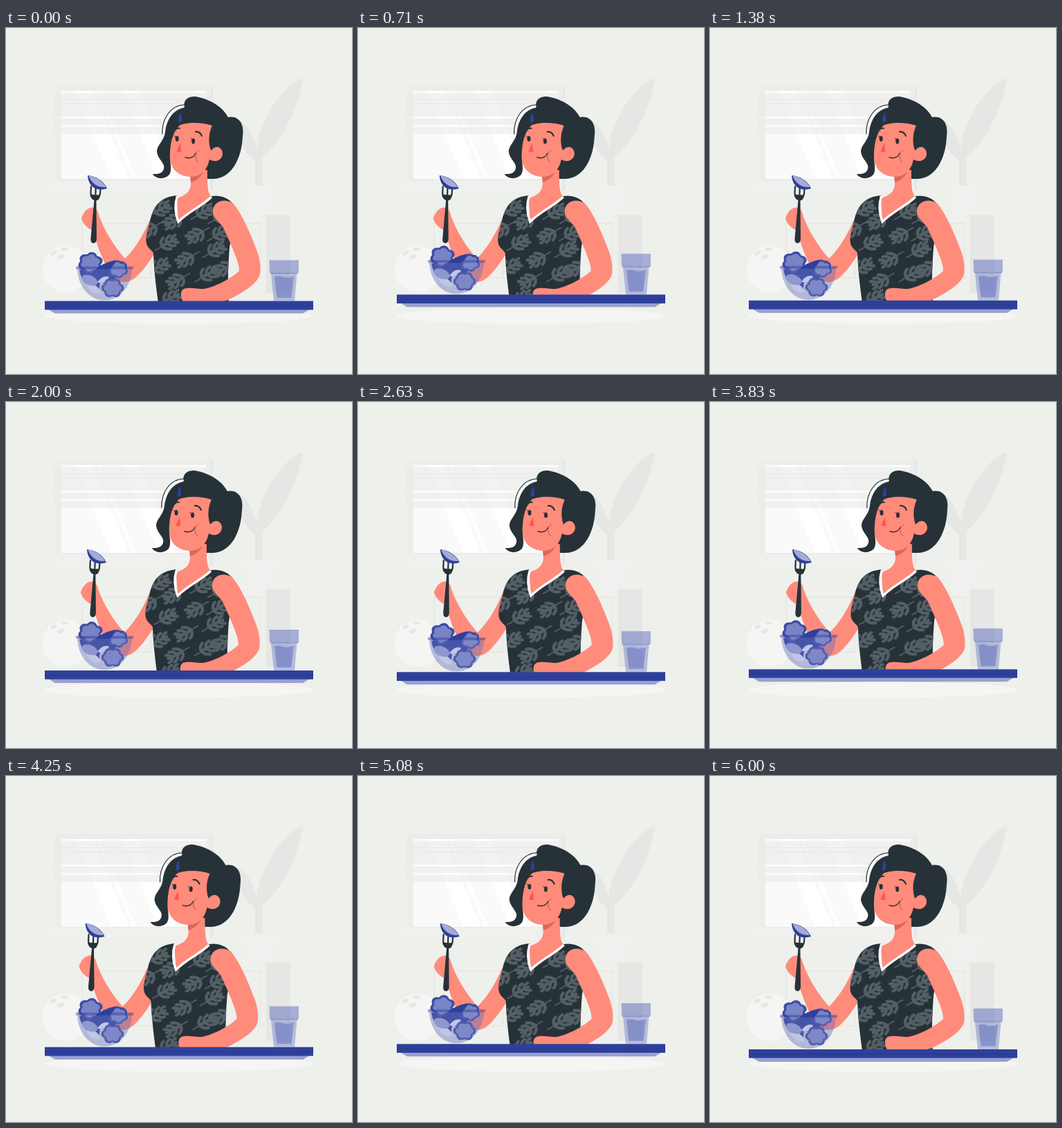
Recreate the animation shown at these times as an HTML page. Size 500 by 500 pixels, loop 6.04 s.

```html
<!DOCTYPE html>
<html lang="en">
<head>
<meta charset="utf-8">
<title>Salad lunch</title>
<style>
  html, body { margin: 0; width: 100%; height: 100%; overflow: hidden; background: #eef0eb; }
  svg { display: block; width: 100vw; height: 100vh; }
  .ink { fill: #263238; }
  .skin { fill: #ff8b7b; }
  .blue { fill: #2f409b; }
  .line { fill: none; stroke: #263238; stroke-linecap: round; }
</style>
</head>
<body>
<svg viewBox="0 0 500 500">
  <defs>
    <clipPath id="shirtClip"><use href="#shirtShape"/></clipPath>
    <clipPath id="paneClip"><path d="M80 91H290V218H80Z"/></clipPath>
    <path id="shirtShape" d="M247 242C225 244 213 255 208 280C205 292 200 305 204 314C207 320 211 321 213 325C214 350 217 375 220 397H322C320 370 321 345 323 318C326 300 334 265 328 254C320 244 307 241 297 243C284 257 265 266 249 280C244 268 244 255 247 242Z"/>
    <g id="leaf" fill="none" stroke="#535f65" stroke-linecap="round">
      <path stroke-width="1.800" d="M-18 8Q-13 7 -7 3"/>
      <path stroke-width="4.500" d="M-7 3Q3 -1 14 -4"/>
      <path stroke-width="4.300" d="M-7 3Q-10 -3 -4 -8M0 0Q-1 -7 6 -10M8 -3Q8 -8 14 -10M-7 4Q-2 9 5 9M1 1Q6 6 12 5M8 -2Q13 1 17 1"/>
    </g>
  </defs>

  <g id="room">
    <path fill="#ececeb" d="M72 84H299V236H72Z"/>
    <path fill="#e6e6e5" d="M296 84H299V234H296Z"/>
    <path fill="#f0f0ee" d="M64 220H294V236H64Z"/>
    <path fill="#fafafa" d="M80 91H290V218H80Z"/>
    <path clip-path="url(#paneClip)" fill="#fff" d="M100 91H125L177 218H152ZM131 91H136L188 218H183ZM168 91H193L245 218H220Z"/>
    <path fill="#ebebea" opacity=".65" d="M70 94H298V128H70ZM70 131H298V140H70ZM70 143H298V153H70Z"/>
    <path fill="none" stroke="#e8e8e7" d="M76 103.500H290M76 109.500H290"/>
    <path fill="#f0f0ee" d="M112 266H376V270H112Z"/>
    <path fill="none" stroke="#e6e6e5" stroke-width="1.400" d="M110 282H209.500V361H110ZM215 282H367.500V361H215Z"/>
    <path fill="#e6e6e5" d="M429 72C405 80 368 125 362 176C358 158 350 140 336 132C333 158 342 178 360 191V231H370.500V186C396 168 422 118 429 72Z"/>
    <path fill="#f0f0ef" d="M341 228H393L384 270H350Z"/>
    <path fill="#e6e6e5" d="M376 270H411V383H376Z"/>
    <circle cx="86.500" cy="348.500" r="34" fill="#f5f5f4"/>
    <g fill="#e6e6e5">
      <ellipse cx="69" cy="325" rx="5" ry="3" transform="rotate(-30 69 325)"/>
      <ellipse cx="79" cy="331" rx="5.500" ry="3" transform="rotate(-22 79 331)"/>
      <ellipse cx="84.500" cy="319.500" rx="5.500" ry="2.500"/>
    </g>
    <ellipse cx="250" cy="416" rx="194" ry="11.500" fill="#f5f5f4"/>
  </g>

  <g id="woman">
    <path class="ink" d="M258 117C255 103 264 99 273 99C289 101 312 111 321 129C338 126 345 141 342 157C341 185 328 217 300 218H290L280 160L251 140Z"/>
    <path class="skin" d="M268 208L267 227C266 238 258 242 247 246L249 279L298 244C292 241 291 232 291 205Z"/>
    <path fill="#d9685c" d="M266 213L267 223Q278 220 285 209Z"/>
    <path class="skin" d="M253 133C240 150 235 172 237 189C239 206 251 214 266 215C282 215 291 205 294 190C305 196 314 189 313 180C311 170 301 170 297 177L298 139Z"/>
    <path class="ink" d="M247 142C262 135 282 136 298 141C293 152 292 164 296 177L309 150L298 126L258 116Z"/>
    <path class="ink" d="M259 115C242 117 232 132 230 151C228 164 219 168 218 178C219 191 233 196 227 206C224 211 218 211 212 211C217 219 230 219 236 212C241 205 236 192 237 182C238 164 241 148 255 137Z"/>
    <path fill="none" stroke="#fff" stroke-width="1.500" d="M228 153C228 133 239 115 258 113"/>
    <path class="line" stroke-width="1.200" d="M226 153C225 131 238 111 259 111"/>
    <path class="blue" d="M249 137Q249 128 252 122Q255 129 254 135Z"/>
    <ellipse class="ink" cx="247.200" cy="160" rx="2.500" ry="4"/>
    <ellipse class="ink" cx="270.700" cy="163.500" rx="2.500" ry="4"/>
    <path class="line" stroke-width="1" d="M245 158L243.500 156M269 161L267 159.500"/>
    <path class="line" stroke-width="2" d="M245 147Q247 144 251 145M274 150Q280 149 283 156"/>
    <path fill="#ff5550" d="M252 166L246.500 178Q249 180 253.500 179Z"/>
    <path class="line" stroke-width="1.300" d="M259 187Q270 190 274 181"/>
    <path fill="none" stroke="#b94f49" d="M279 177C273 181 272 188 278 194"/>

    <path class="skin" d="M109 275C111 269 115 263 119 261C125 258 131 260 133 266C138 284 153 312 172 333C184 322 198 301 208 277L215 325C206 340 193 357 184 363C172 371 158 367 150 354C140 335 130 312 127 293C119 291 111 283 109 275Z"/>
    <use href="#shirtShape" class="ink"/>
    <g id="leaves" clip-path="url(#shirtClip)"></g>
    <path fill="none" stroke="#fff" stroke-width="3.300" d="M247.500 243C243 257 245 269 249 280C265 264 284 257 297 244"/>
    <path class="skin" d="M299 264C300 251 314 245 328 253C341 268 354 299 362 320C367 333 369 347 367 356C363 369 347 380 321 393Q310 397 290 397H257C252 390 251 380 257 377C264 374 277 377 286 377C300 375 326 362 337 351C338 340 325 313 314 288C304 276 298 272 299 264Z"/>

    <path class="line" stroke-width="2.200" d="M123 229L122.500 239Q122.500 246 128.500 247Q135 246 136 240L136.500 231M129.800 229L129.300 246"/>
    <path class="ink" d="M122.500 240Q129 242 136 241Q136 248 130.500 249.500L131 304Q131 311 126.500 311Q122 311 122.500 304L127.500 249Q122 247 122.500 240Z"/>
    <path class="blue" d="M118 213C131 214 142 222 146 232C129 237 119 228 118 213Z"/>
    <path fill="#a5abd6" d="M119.500 213.500C131 215 140 222 144.500 230C132 231 123 224 119.500 213.500Z"/>
  </g>

  <g id="table">
    <path fill="#98a0d0" d="M61 407H439L429 413H71Z"/>
    <path class="blue" d="M56 395H444V407.700H56Z"/>
    <path fill="none" stroke="#283783" stroke-width=".8" d="M56 401.700H444"/>
    <path fill="#2f409b" opacity=".25" d="M103 347C104 375 121 394 142 394C164 394 181 375 182 347Z"/>
    <g id="salad">
      <path class="blue" d="M106 350C118 347 143 352 158 337L171 338L160 360L150 372L136 368L134 382L118 372Q108 364 106 350Z"/>
      <path fill="#d3d6ea" d="M116 371Q132 368 137 383Q122 386 116 371ZM132 368Q139 357 149 360Q145 372 132 368Z"/>
      <ellipse cx="121" cy="365" rx="12" ry="7" transform="rotate(22 121 365)" fill="#8e98cd"/>
    </g>
    <path fill="#8b95cd" opacity=".25" d="M103 349C104 375 121 394 142 394C164 394 181 375 182 349Z"/>
    <path fill="#2f409b" opacity=".45" d="M101 345H184V349H101Z"/>
    <g fill="#3f51b5">
      <path opacity=".42" d="M380.500 336H423V352Q423 355.500 420 355.500H384Q381 355.500 381 352Z"/>
      <path opacity=".32" d="M383 355.500H420.500L417 395H387Z"/>
      <path opacity=".38" d="M388 360Q396 358 402 361Q409 362 416 359L412.500 390.500H391.500Z"/>
      <path opacity=".4" d="M382 354.500H421.500V355.500H382Z"/>
    </g>
  </g>
</svg>
<script>
const $ = id => document.getElementById(id);
const LOOP = 6040, FLOAT = LOOP / 4, LEAD = 30;
const SWAY = [0, -1, 2, -4, 4, -4, 4, -4, 2, -1, 0];

function add(parent, tag, attrs) {
  const node = document.createElementNS('http://www.w3.org/2000/svg', tag);
  for (const name in attrs) node.setAttribute(name, attrs[name]);
  return parent.appendChild(node);
}

// x, y, and 1 for a leaf turned around
const LEAVES = [
  [222, 262, 0], [244, 279, 1], [277, 299, 1], [309, 272, 0], [232, 311, 0],
  [308, 297, 0], [301, 321, 0], [262, 334, 1], [290, 356, 0], [220, 345, 0],
  [249, 365, 1], [236, 391, 0], [318, 347, 1], [209, 291, 1], [284, 266, 0], [314, 385, 1]
];
for (const [x, y, turned] of LEAVES) {
  add($('leaves'), 'use', {
    href: '#leaf',
    transform: `translate(${x} ${y}) rotate(${turned ? 172 : -8})`
  });
}

function frill(cx, cy, r, turn) {
  const outline = size => {
    const points = [];
    for (let i = 0; i < 72; i++) {
      const a = i * Math.PI / 36;
      const d = size * (0.9 + 0.2 * Math.abs(Math.cos(3 * a + turn)));
      points.push(`${(cx + d * Math.cos(a)).toFixed(1)} ${(cy + d * 0.88 * Math.sin(a)).toFixed(1)}`);
    }
    return `M${points.join('L')}Z`;
  };
  add($('salad'), 'path', { d: outline(r), fill: '#3d4ca6' });
  add($('salad'), 'path', { d: outline(r * 0.78), fill: '#7984c4' });
}
frill(122, 340, 16.5, 1);
frill(162, 349, 13.5, 2);
frill(154, 376, 15, 0);
add($('salad'), 'path', { class: 'blue', d: 'M124 354Q137 340 158 336Q157 346 142 354Q132 358 124 354Z' });

function sway(phase) {
  const p = phase * 10, i = Math.floor(p);
  return SWAY[i] + (SWAY[i + 1] - SWAY[i]) * (p - i);
}

function draw(t) {
  const p = t % FLOAT / FLOAT;
  const lift = 10 * (1 - Math.abs(2 * p - 1));
  $('table').setAttribute('transform', `translate(0 ${-lift})`);
  $('woman').setAttribute('transform', `translate(${sway(t / LOOP)} 0)`);
}

const start = performance.now();
function tick() {
  draw((performance.now() - start + LEAD) % LOOP);
  requestAnimationFrame(tick);
}
tick();
</script>
</body>
</html>
```
